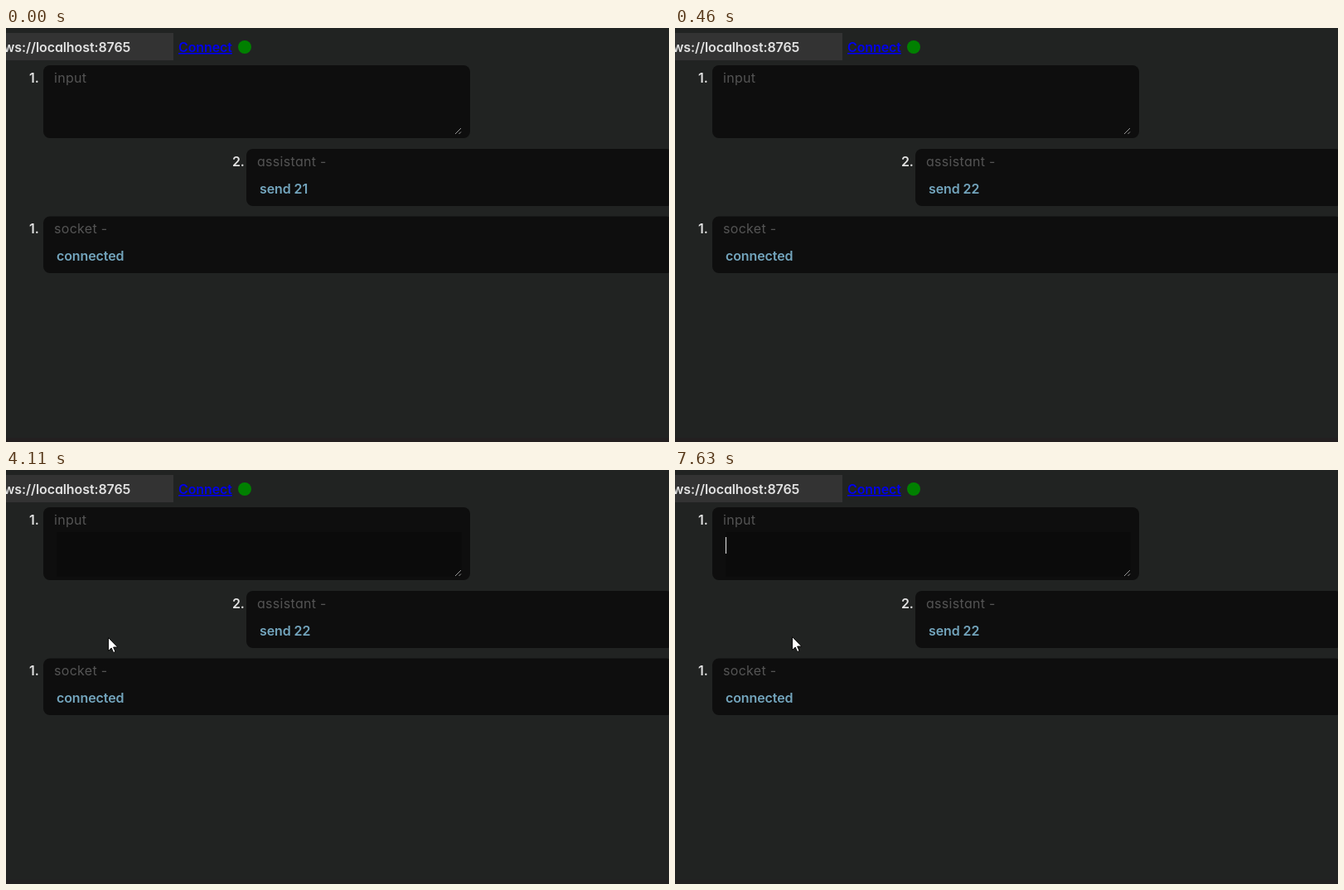
An HTML page for the animation above (8000 ms loop, 800 px wide and 500 px high).

```html
<!DOCTYPE html>
<html lang="en">
<head>
<meta charset="utf-8">
<title>Socket console</title>
<style>
  html, body { margin: 0; width: 100%; height: 100%; overflow: hidden; background: #212322; }
  svg { display: block; width: 800px; height: 500px; }
  text { font-size: 16px; white-space: pre; }
  .styled text { font-family: Inter, "Noto Sans", sans-serif; font-weight: 600; letter-spacing: -.1px; font-feature-settings: "cv11"; }
  .styled .muted { font-weight: 400; letter-spacing: .3px; }
  .plain text { font-family: "Liberation Sans", Arial, sans-serif; }
  .light { fill: #e2e2e2; }
  .muted { fill: #545454; }
  .reply { fill: #73a5bd; }
  .link { fill: #0000ee; text-decoration: underline; }
  .styled .link { text-decoration-thickness: 1px; text-underline-offset: 1px; }
</style>
</head>
<body>
<svg id="stage" viewBox="0 0 800 500"></svg>
<script>
const LOOP = 8000;
const stage = document.getElementById("stage");

function add(parent, tag, attrs, content) {
  const el = document.createElementNS("http://www.w3.org/2000/svg", tag);
  for (const key in attrs) el.setAttribute(key, attrs[key]);
  if (content) el.textContent = content;
  parent.appendChild(el);
  return el;
}

// Baselines sit on whole pixels.
function label(parent, x, y, content, kind) {
  return add(parent, "text", { x, y: Math.floor(y), class: kind }, content);
}

// One message box; a header height darkens its top strip.
function panel(parent, x, y, right, bottom, radius, header) {
  const w = right - x;
  add(parent, "rect", { x, y, width: w, height: bottom - y, rx: radius, fill: header ? "#111" : "#0e0e0e" });
  if (header) {
    add(parent, "path", {
      d: `M${x} ${y + header}v${radius - header}a${radius} ${radius} 0 0 1 ${radius} ${-radius}` +
         `h${w - 2 * radius}a${radius} ${radius} 0 0 1 ${radius} ${radius}v${header - radius}z`,
      fill: "#090909"
    });
  }
}

function grip(parent, y) {
  add(parent, "path", { d: `M542 ${y}l7 -7M546.5 ${y}l2.5 -2.5`, stroke: "#999", "stroke-width": 1, fill: "none" });
}

function buildPage(o) {
  const g = add(stage, "g", { class: o.name });
  add(g, "rect", { x: 0, y: o.field[1], width: o.field[0], height: o.field[2], fill: "#333" });
  label(g, -3, o.top, "ws://localhost:8765", "light");
  label(g, o.linkX, o.top, "Connect", "link");
  add(g, "circle", { cx: o.dot[0], cy: o.dot[1], r: 8, fill: "#008000" });

  const [a, b, c] = o.boxes;
  panel(g, 45, a[0], 560, a[1], o.radius, o.header);
  panel(g, 290, b[0], 805, b[1], o.radius, o.header);
  panel(g, 45, c[0], 805, c[1], o.radius, o.header);

  const rows = [[45, a, "1.", "input"], [290, b, "2.", "assistant -"], [45, c, "1.", "socket -"]];
  for (const [x, box, mark, title] of rows) {
    const y = box[0] + o.titleDy;
    label(g, x - o.markDx, y, mark, "light");
    label(g, x + 13, y, title, "muted");
  }
  const focus = add(g, "rect", { x: 61, y: a[0] + 30, width: 489, height: 54, fill: "#0b0b0b", visibility: "hidden" });
  grip(g, a[1] - 5);
  const sent = label(g, 306, b[0] + o.bodyDy, "send 22", "reply");
  label(g, 61, c[0] + o.bodyDy, "connected", "reply");
  return { g, focus, sent };
}

add(stage, "rect", { width: 800, height: 500, fill: "#212322" });
const shade = add(stage, "rect", { width: 800, height: 296, fill: "#222" });
add(stage, "rect", { y: 495, width: 800, height: 5, fill: "#231f20" });

const styled = buildPage({
  name: "styled", field: [202, 6, 33], top: 29, linkX: 208, dot: [288, 23],
  boxes: [[45, 133], [146, 215], [227.5, 296]], radius: 8, header: 0,
  titleDy: 21, bodyDy: 54, markDx: 17
});
const plain = buildPage({
  name: "plain", field: [200, 0, 27], top: 17, linkX: 206, dot: [281, 12],
  boxes: [[33, 115], [128, 193], [206, 270]], radius: 10, header: 28,
  titleDy: 19, bodyDy: 50, markDx: 18
});

const caret = add(stage, "rect", { x: 61, y: 81, width: 1, height: 20, fill: "#e8e8e8" });
const beam = add(stage, "path", {
  d: "M0 .5H3M4 .5H7M3.5 1V15M0 15.5H3M4 15.5H7", stroke: "#fff", fill: "none"
});
const arrow = add(stage, "path", {
  d: "M.5 .5V16.5L4.2 13L6.7 18.5L9 17.5L6.6 12H11.7Z", fill: "#fff", stroke: "#000", "stroke-width": .9
});

// Pointer stops: time, shape, x, y.
const stops = [
  [2640, beam, 126, 72], [2730, beam, 131, 103],
  [3660, arrow, 129, 138], [3750, arrow, 121, 165], [3840, arrow, 112, 192],
  [3930, arrow, 105, 210], [4110, arrow, 123, 202], [4200, arrow, 141, 201]
];
const blinks = [3380, 3930, 4470, 5000, 5470, 5990, 6540, 7100, 7630];

function show(el, on) {
  el.setAttribute("visibility", on ? "visible" : "hidden");
}

function draw(t) {
  const reloading = t >= 280 && t < 460;
  styled.g.style.display = reloading ? "none" : "";
  plain.g.style.display = t >= 370 && t < 460 ? "" : "none";
  show(shade, reloading);
  styled.sent.textContent = t < 280 ? "send 21" : "send 22";
  show(styled.focus, t >= 3380);
  show(caret, blinks.filter(b => b <= t).length % 2 === 1);

  const stop = stops.filter(s => s[0] <= t).pop();
  for (const shape of [beam, arrow]) show(shape, stop && stop[1] === shape);
  if (stop) stop[1].setAttribute("transform", `translate(${stop[2]} ${stop[3]})`);
}

const start = performance.now();
function tick() {
  draw((performance.now() - start) % LOOP);
  requestAnimationFrame(tick);
}
draw(0);
requestAnimationFrame(tick);
</script>
</body>
</html>
```
